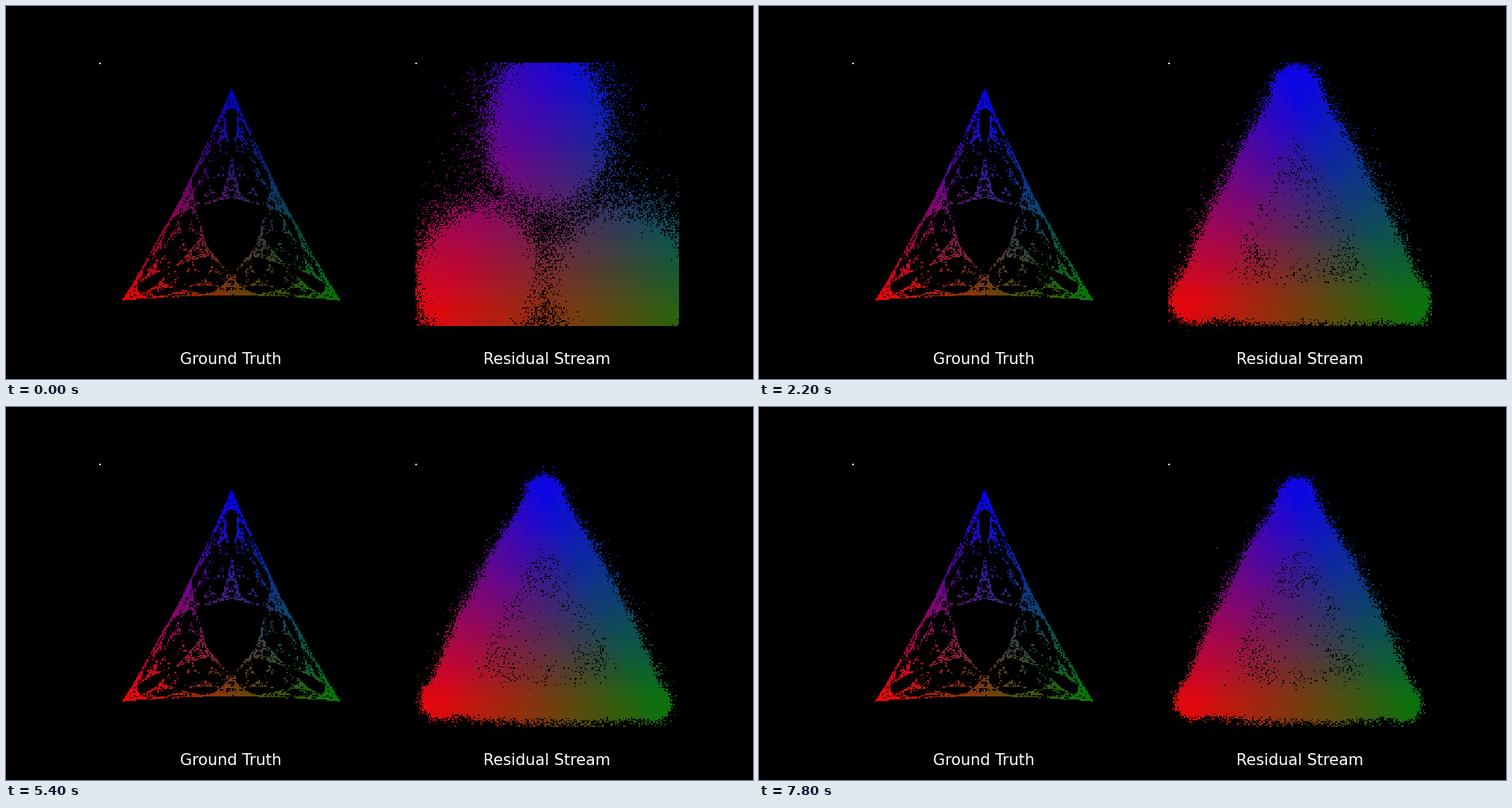
These frames come from a looping animation (1000 px wide and 500 px high, 8000 ms). A matplotlib script:

```python
import numpy as np
import matplotlib.pyplot as plt
from matplotlib.animation import FuncAnimation

FRAMES, INTERVAL = 40, 200
GRID = 230                     # cells per panel side
SIDE, TOP = 352.27, 76.4       # panel size and top edge in stage pixels
LEFT_X, RIGHT_X = 125.0, 547.73
RGB = np.array([[1, 0, 0], [0, 0.5, 0], [0, 0, 1]])  # red, green, blue states
rng = np.random.default_rng(7)


def token_matrices(x=0.05, a=0.85):
    """Three-state, three-token hidden Markov process."""
    b, y = (1 - a) / 2, 1 - 2 * x
    move = np.full((3, 3), x) + (y - x) * np.eye(3)
    emit = np.full((3, 3), b) + (a - b) * np.eye(3)
    return np.array([move * emit[k] for k in range(3)])


def sample_beliefs(chains=12000, burn=8, steps=40, temper=0.85):
    """Beliefs along random token sequences, their successors and last tokens."""
    mats = token_matrices()
    emit = mats.sum(axis=2).T
    eta = np.full((chains, 3), 1 / 3)
    beliefs, tokens = [], []
    for step in range(burn + steps + 1):
        prob = (eta @ emit) ** temper
        cum = np.cumsum(prob / prob.sum(axis=1, keepdims=True), axis=1)
        tok = (rng.random((chains, 1)) > cum[:, :2]).sum(axis=1)
        eta = np.einsum("ni,nij->nj", eta, mats[tok])
        eta /= eta.sum(axis=1, keepdims=True)
        if step >= burn:
            beliefs.append(eta)
            tokens.append(tok)
    return (np.concatenate(beliefs[:-1]), np.concatenate(beliefs[1:]),
            np.concatenate(tokens[:-1]))


def fixed_points():
    pts = []
    for mat in token_matrices():
        eta = np.full(3, 1 / 3)
        for _ in range(40):
            eta = eta @ mat
            eta /= eta.sum()
        pts.append(eta)
    return np.array(pts)


def cells(pos, x0):
    """Grid indices of the points that fall inside a panel."""
    col = np.floor((pos[:, 0] - x0) * GRID / SIDE).astype(int)
    row = np.floor((pos[:, 1] - TOP) * GRID / SIDE).astype(int)
    inside = (col >= 0) & (col < GRID) & (row >= 0) & (row < GRID)
    return row[inside], col[inside], inside


def lerp(a, b, m):
    return (1 - m) * np.asarray(a) + m * np.asarray(b)


beliefs, successors, tokens = sample_beliefs()
count = len(beliefs)
to_corners = np.linalg.inv(fixed_points())

# Fractal of the exact beliefs
truth_pos = beliefs @ to_corners @ np.array([[157, 393.6], [445.5, 393.6], [301.6, 113]])
rows, cols, inside = cells(truth_pos, LEFT_X)
truth = np.zeros((GRID, GRID, 3))
truth[rows, cols] = beliefs[inside] @ RGB

# Learned cloud: beliefs smeared towards their successors,
# with per-point noise that drifts slowly
learned = lerp(beliefs, successors, rng.random((count, 1)))
tail = 1 + 0.6 * (rng.random((count, 1)) < 0.08)
noise_a = rng.standard_normal((count, 2)) * tail
noise_b = rng.standard_normal((count, 2)) * tail
wobble = rng.normal(0, 1, (FRAMES, 3, 2))
spread = 8 * (1 - learned.max(axis=1, keepdims=True))

OUTWARD = np.array([[0.88, -0.46], [-0.88, -0.46], [0, 1]])  # away from red, green, blue
edge_mass = np.stack([learned[:, 1] * learned[:, 2],
                      learned[:, 0] * learned[:, 2],
                      learned[:, 0] * learned[:, 1]], axis=1)
bulge = 50 * edge_mass @ OUTWARD

BLOBS = np.array([[621, 372], [836, 382], [724, 148]])
BLOB_SIZE = np.array([[25, 28], [32, 33], [25, 33]])
START_TINT = [[535, 435], [985, 438], [748, 18]]
END_TINT = [[553, 412], [893, 412], [721, 88]]

TIMES = [1.4, 3.0, 4.2, 7.8]
SIGMA = [8.8, 6.6, 6.0, 5.4]
RED_X = [578, 583, 580, 582]
GREEN_X = [869, 866, 865, 863]
BLUE_Y = [108, 110, 115, 117]

axis = (np.arange(GRID) + 0.5) * SIDE / GRID
grid_x, grid_y = np.meshgrid(RIGHT_X + axis, TOP + axis)
grid_pts = np.stack([grid_x, grid_y, np.ones_like(grid_x)], axis=-1)


def settle(t):
    """Progress from token blobs to the triangle."""
    return 1 - (1 - min(t / 1.4, 1)) ** 2


def tint(vertices):
    """Colour of every cell from its place between three vertices."""
    frame = np.column_stack([vertices, np.ones(3)])
    weight = np.clip(grid_pts @ np.linalg.inv(frame), 0.06, None)
    weight /= weight.sum(axis=-1, keepdims=True)
    return weight @ RGB


def cloud(i):
    t = i * INTERVAL / 1000
    m = settle(t)
    corners = np.array([[np.interp(t, TIMES, RED_X), 393],
                        [np.interp(t, TIMES, GREEN_X), 397],
                        [720, np.interp(t, TIMES, BLUE_Y)]]) + wobble[i]
    shape = learned @ to_corners @ corners + bulge
    blob = BLOBS[tokens] + 0.2 * (shape - corners[tokens])
    size = lerp(BLOB_SIZE[tokens], np.interp(t, TIMES, SIGMA) + spread, m)
    turn = 0.12 * i
    noise = np.cos(turn) * noise_a + np.sin(turn) * noise_b
    r, c, _ = cells(lerp(blob, shape, m) + size * noise, RIGHT_X)
    filled = np.zeros((GRID, GRID, 1))
    filled[r, c] = 1
    return filled * tint(lerp(START_TINT, END_TINT, m))


def marked(img):
    img = np.clip(img, 0, 1)
    img[0, 0] = 1
    return img


fig, axes = plt.subplots(1, 2, figsize=(10, 5), dpi=100, facecolor="black")
panels = []
for ax, x, label in zip(axes, (301.1, 723.9), ("Ground Truth", "Residual Stream")):
    ax.axis("off")
    panels.append(ax.imshow(np.zeros((GRID, GRID, 3)), interpolation="nearest"))
    fig.text(x / 1000, 0.04, label, color="white", fontsize=15,
             family="DejaVu Sans", ha="center", va="baseline")


def draw(i):
    dim = lerp([0.95, 0.95, 0.78], [1, 1, 1], settle(i * INTERVAL / 1000))
    panels[0].set_data(marked(truth * dim))
    panels[1].set_data(marked(cloud(i)))
    return panels


anim = FuncAnimation(fig, draw, frames=FRAMES, interval=INTERVAL,
                     repeat=True, repeat_delay=0, blit=False)
plt.show()
```
